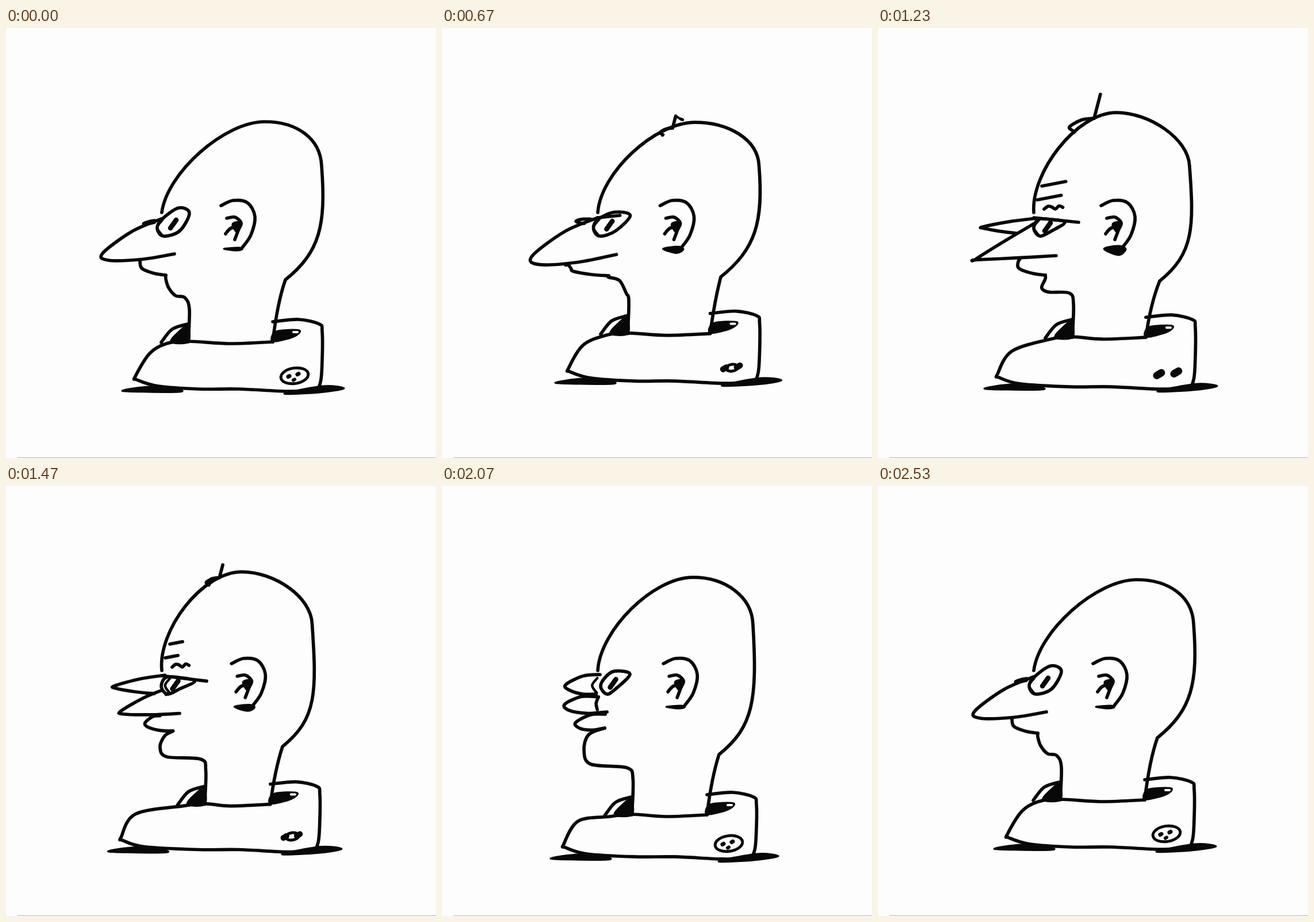
These frames come from a looping animation (748 by 748 pixels, 2.56 s). An HTML page with a canvas:

```html
<!DOCTYPE html>
<html lang="en">
<head>
<meta charset="utf-8">
<title>Morphing head</title>
<style>
html, body { margin: 0; width: 100%; height: 100%; overflow: hidden; background: #fdfdfd }
canvas { display: block }
</style>
</head>
<body>
<canvas id="stage" width="748" height="748"></canvas>
<script>
const ctx = document.getElementById('stage').getContext('2d');
const INK = '#080808', PAPER = '#fdfdfd', LOOP = 2560, STEP = 100 / 3, WEIGHT = 5.7;
const keyTimes = [0, 370, 970, 1230, 1730, 2070, 2530];

// One value or point per key pose; the last pose leads back to the first.
const bust = {
  base: [628, 619, 609, 624, 642, 645],
  top: [546, 535, 528, 538, 571, 572],
  toe: [225, 223, 217, 208, 192, 212],
  right: [550, 550, 555, 552, 539, 547],
  neck: [317, 318, 328, 338, 354, 330],
};
const skull = {
  apex: [[450, 163], [450, 167], [430, 161], [415, 147], [405, 152], [437, 159]],
  back: [549, 550, 553, 542, 522, 541],
  bend: [[486, 438], [484, 434], [486, 432], [490, 440], [471, 468], [482, 467]],
  ear: [0, 1, 10, 14, 23, 11],
};
const face = {
  chin: [[283, 452], [306, 439], [312, 440], [285, 452], [249, 458], [247, 460]],
  jaw: [[311, 469], [319, 468], [330, 468], [333, 461], [345, 491], [321, 490]],
  eyeLeft: [263, 263, 264, 271, 269, 276],
  eyeTop: [313, 314, 327, 333, 333, 322],
  eyeCorner: [[319, 322], [327, 324], [328, 328], [325, 338], [332, 341], [327, 327]],
  lid: [263, 263, 264, 271, 283, 261],
};
// Beaks: root, tip, end and roundness of the tip
const beaks = {
  nose: [[270, 332, 168, 392, 293, 393, 10], [272, 328, 163, 392, 297, 393, 13], [270, 332, 150, 402, 310, 395, 11],
    [275, 338, 170, 402, 310, 396, 1], [284, 368, 233, 380, 293, 395, 8], [272, 367, 213, 380, 287, 393, 9]],
  bill: [[258, 335, 240, 340, 258, 338, 1], [250, 336, 250, 336, 250, 336, 0], [268, 329, 217, 335, 245, 344, 4],
    [275, 331, 182, 346, 240, 357, 2], [278, 327, 195, 350, 278, 366, 5], [275, 328, 215, 346, 268, 362, 8]],
  lip: [[232, 404, 234, 414, 278, 430, 5], [222, 411, 230, 417, 290, 431, 4], [208, 414, 219, 420, 290, 431, 4],
    [246, 403, 243, 414, 291, 430, 5], [292, 396, 240, 411, 290, 422, 7], [284, 397, 232, 412, 283, 421, 8]],
};
const amounts = {
  bold: [0, .15, 1, 1, 0, 0],
  brow: [0, 0, 1, 1, 1, 0],
  sprout: [0, 0, 1, 1, 0, 0],
  leaf: [0, 0, 1, 0, 0, 0],
  wrinkle: [0, 0, 0, 1, 0, 0],
  frown: [0, 0, 0, 1, .8, 0],
  cheek: [0, 0, 0, 0, 1, 1],
};
const tracks = { ...bust, ...skull, ...face, ...beaks, ...amounts };

const mix = (a, b, f) => Array.isArray(a) ? a.map((v, k) => mix(v, b[k], f)) : a + (b - a) * f;

function poseAt(i, f) {
  const pose = {};
  for (const name in tracks) pose[name] = mix(tracks[name][i], tracks[name][(i + 1) % 6], f);
  return pose;
}

function stroke(width = WEIGHT, ink = INK) {
  ctx.lineWidth = width;
  ctx.strokeStyle = ink;
  ctx.stroke();
}

// Smooth curve through the points
function trace(pts, closed) {
  const n = pts.length;
  const at = j => closed ? pts[(j + n) % n] : pts[Math.max(0, Math.min(n - 1, j))];
  ctx.beginPath();
  ctx.moveTo(...pts[0]);
  for (let j = 0; j < (closed ? n : n - 1); j++) {
    const [a, b, c, d] = [at(j - 1), at(j), at(j + 1), at(j + 2)];
    ctx.bezierCurveTo(b[0] + (c[0] - a[0]) / 6, b[1] + (c[1] - a[1]) / 6,
      c[0] - (d[0] - b[0]) / 6, c[1] - (d[1] - b[1]) / 6, ...c);
  }
}

function line(pts, width, ink) {
  trace(pts);
  stroke(width, ink);
}

function blob(pts, fill = INK, width = 3) {
  trace(pts, true);
  ctx.fillStyle = fill;
  ctx.fill();
  stroke(width);
}

function beak([rx, ry, tx, ty, ex, ey, r]) {
  if (Math.hypot(tx - rx, ty - ry) < 4) return;
  const ux = tx + r, uy = ty + 1.2 * r;
  line([[rx, ry], [(rx + tx) / 2, (ry + ty) / 2 - .8 * r], [tx, ty], [ux, uy],
    [(ux + ex) / 2, (uy + ey) / 2 + .4 * r], [ex, ey]]);
}

function drawBust({ base, top, toe, right, neck, bold }) {
  const nape = right - 86;
  blob([[toe - 23, base + 3], [toe + 25, base - 4], [toe + 75, base + 1], [toe + 76, base + 5], [toe + 20, base + 5]]);
  blob([[right - 66, base + 8], [right + 1, base - 5], [right + 38, base - 1], [right - 5, base + 6]]);

  line([[neck - 47, top + 1], [neck - 28, top - 22], [neck - 1, top - 31]]);
  blob([[neck - 30, top], [neck - 16, top - 18], [neck - 1, top - 27], [neck, top]]);
  blob([[nape, top - 1], [nape + 6, top - 18], [nape + 46, top - 20], [nape + 36, top - 9]]);
  line([[nape + 36, top - 17], [nape + 43, top - 17]], 4, PAPER);

  line([[nape, top - 35], [nape + 45, top - 39], [right - 5, top - 31], [right, top - 18], [right, base - 50],
    [right - 3, base - 12], [right - 14, base + 1], [490, base + 4], [405, base], [335, base], [toe + 40, base - 5],
    [toe + 3, base - 16], [toe, base - 22], [toe + 25, base - 62], [neck - 38, top + 3], [neck, top - 1],
    [390, top + 3], [nape, top]]);

  const x = right - 48, y = base - 23, ring = 1 - bold;
  const dot = (dx, dy, width, reach) =>
    line([[x + dx - reach, y + dy + reach * .6], [x + dx + reach, y + dy - reach * .6]], width);
  if (ring > .1) {
    ctx.beginPath();
    ctx.ellipse(x, y, 24 * ring, 13.5 * ring, -.15, 0, 7);
    stroke(5);
    dot(-1, 7, 6 * ring, 1);
  }
  dot(-10 - 5 * bold, 1, 7 + 6 * bold, 1 + 3 * bold);
  dot(6 + 9 * bold, -3 + bold, 7 + 6 * bold, 1 + 3 * bold);
}

function drawSkull({ apex: [ax, ay], back, bend: [bx, by], right, top, sprout, leaf }) {
  const nape = right - 86;
  ctx.beginPath();
  ctx.moveTo(271, 321);
  ctx.bezierCurveTo(262 + (ax - 405) * .4, 252, ax - 70, ay, ax, ay);
  ctx.bezierCurveTo(ax + 56, ay, back - 2, 192, back, 240);
  ctx.bezierCurveTo(back + 8, by - 95, bx + 60, by - 48, bx, by);
  ctx.quadraticCurveTo(nape + 8, by + 40, nape, top);
  stroke();

  if (sprout < .05) return;
  const x = ax - 39, y = ay + 10, tipX = x + 11 * sprout, tipY = y - 42 * sprout;
  line([[x, y], [tipX, tipY]]);
  beak([x, y, x - 43 * sprout, y + 15 * sprout, x - 34 * sprout, y + 23 * sprout, 6 * sprout]);
  if (leaf < .05) return;
  line([[tipX, tipY], [tipX + 14 * leaf, tipY + 8 * leaf]], 4);
  ctx.beginPath();
  ctx.ellipse(tipX + 20 * leaf, tipY + 11 * leaf, 10 * leaf, 5.5 * leaf, .35, 0, 7);
  ctx.fill();
}

function drawEar({ ear, bold }) {
  ctx.save();
  ctx.translate(ear, 0);
  line([[374, 309], [395, 300], [420, 304], [433, 328], [426, 360], [411, 382]]);
  blob([[379, 384], [405, 382 - 3 * bold], [411 + 6 * bold, 385], [400 + 4 * bold, 387 + 8 * bold]]);
  line([[384, 331], [398, 329], [409, 339], [404, 352], [398, 368]]);
  line([[382, 358], [390, 349], [402, 345]]);
  blob([[394, 341], [409, 338], [402, 355]]);
  ctx.restore();
}

function drawFace(p) {
  const [chinX, chinY] = p.chin, [jawX, jawY] = p.jaw, lipX = p.lip[4], lipY = p.lip[5];
  line([[lipX, lipY], [Math.min(lipX, chinX + 8), mix(lipY, chinY, .3)], [chinX, chinY],
    [chinX + 12, mix(chinY, jawY, .8)], [jawX, jawY], [p.neck + 2, jawY + 20], [p.neck, p.top]]);
  [p.lip, p.nose, p.bill].forEach(beak);
  if (p.cheek > .1) {
    const [x, y] = p.nose;
    line([[x, y], [x - 4 * p.cheek, y + 11 * p.cheek], [x - 2 * p.cheek, y + 22 * p.cheek]]);
  }

  const left = p.eyeLeft, pupilX = 291 + (left - 263) / 2, pupilY = 341 + (p.eyeTop - 313) / 4;
  blob([[left, 349], [left + 8, 333], [300, p.eyeTop], p.eyeCorner, [302, 353], [left + 11, 362]], PAPER, WEIGHT);
  line([[p.lid + 9, 334], [p.lid, 347], [p.lid + 8, 360]], 4.5);
  line([[pupilX - 5, pupilY + 7], [pupilX + 5, pupilY - 7]], 8.5);
  if (p.brow > .1) line([[271, 330], [271 + 78 * p.brow, p.eyeCorner[1]]]);

  for (let n = 0; n < 2 && p.wrinkle > .05; n++) {
    const x = 285 - 8 * n, y = 275 + 24 * n, reach = 42 * p.wrinkle;
    line([[x, y], [x + reach, y - reach * .19]]);
  }
  if (p.frown > .05) {
    const wave = [0, 1, 2, 3, 4, 5].map(n => [289 + n * 6.5 * p.frown, 312 + 3 * Math.cos(n * 2.2)]);
    line(wave);
  }
}

function draw(now) {
  const time = Math.floor((now % LOOP + 4) / STEP) * STEP;
  const t = Math.min(time, keyTimes[6] - .001);
  const i = keyTimes.findIndex((k, j) => t >= k && t < keyTimes[j + 1]);
  const pose = poseAt(i, (t - keyTimes[i]) / (keyTimes[i + 1] - keyTimes[i]));
  ctx.fillStyle = PAPER;
  ctx.fillRect(0, 0, 748, 748);
  ctx.fillStyle = '#b4b4b4';
  ctx.fillRect(20, 747, 728, 1);
  ctx.fillStyle = INK;
  ctx.lineCap = ctx.lineJoin = 'round';
  [drawBust, drawSkull, drawEar, drawFace].forEach(part => part(pose));
  requestAnimationFrame(draw);
}
draw(performance.now());
</script>
</body>
</html>
```
